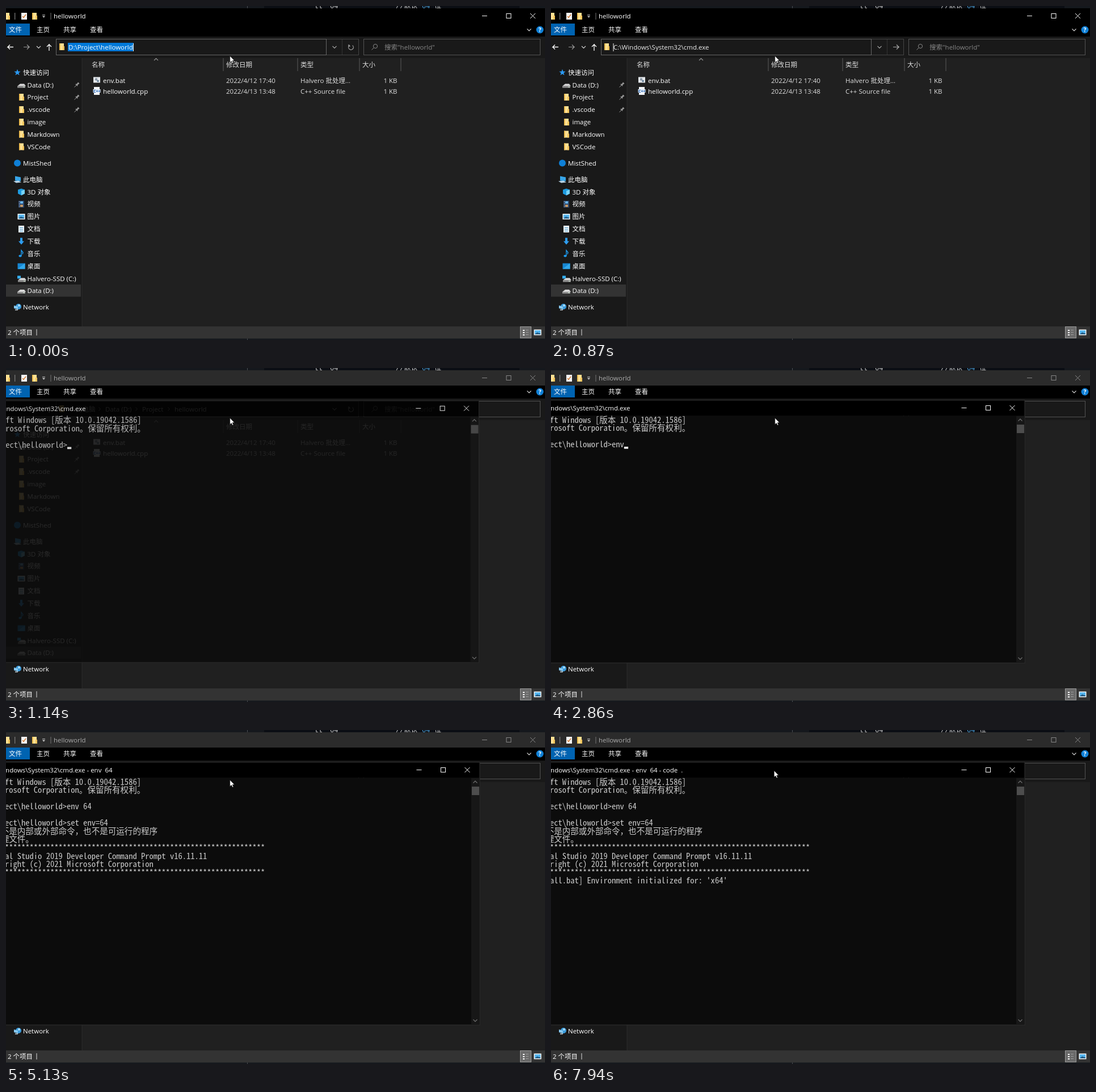
An HTML page with a canvas for the animation above (8000 ms loop, 950 by 590 pixels).

```html
<!DOCTYPE html>
<html lang="zh-CN">
<head>
<meta charset="utf-8">
<style>
html, body { margin: 0; width: 100%; height: 100%; overflow: hidden; background: #000; }
canvas { display: block; }
</style>
</head>
<body>
<canvas id="stage" width="950" height="590"></canvas>
<script>
const g = document.getElementById('stage').getContext('2d');
const LOOP = 8000;
const UI = '11.5px "Open Sans", "Noto Sans CJK SC", "Noto Sans CJK", sans-serif';
const MONO = '14.55px "Noto Sans Mono CJK SC", "Noto Sans CJK SC", "Liberation Mono", monospace';
const CELL = 7.274, ROW = 14.55, LEFT = -53;

function rect(x, y, w, h, color) {
  g.fillStyle = color;
  g.fillRect(x, y, w, h);
}
function frame(x, y, w, h, color) {
  g.strokeStyle = color;
  g.lineWidth = 1;
  g.strokeRect(x, y, w, h);
}
function trace(x, y, pts) {
  g.beginPath();
  for (let i = 0; i < pts.length; i += 2) g.lineTo(x + pts[i], y + pts[i + 1]);
}
function poly(x, y, pts, color) {
  trace(x, y, pts);
  g.fillStyle = color;
  g.fill();
}
function line(x, y, pts, color, width = 1) {
  trace(x, y, pts);
  g.strokeStyle = color;
  g.lineWidth = width;
  g.stroke();
}
function disc(x, y, rx, ry, color) {
  g.beginPath();
  g.ellipse(x, y, rx, ry, 0, 0, 7);
  g.fillStyle = color;
  g.fill();
}
// y is the visual middle of the line
function text(s, x, y, color = '#fff', font = UI) {
  g.font = font;
  g.fillStyle = color;
  g.fillText(s, x, y + 4.2);
}
const chevron = (x, y, color, dir = 1) => line(x, y, [-3.5, -1.7 * dir, 0, 1.8 * dir, 3.5, -1.7 * dir], color, 1.2);

function windowButtons(x, y, color) {
  line(x, y, [-4.5, 0, 4.5, 0], color);
  frame(x + 38.5, y - 4, 8, 8, color);
  line(x + 85, y, [-4.5, -4.5, 4.5, 4.5], color);
  line(x + 85, y, [4.5, -4.5, -4.5, 4.5], color);
}

// Small icons, centred on x, y
const icons = {
  star: (x, y) => {
    const pts = [];
    for (let i = 0; i < 10; i++) {
      const r = i % 2 ? 2.4 : 6, a = i * Math.PI / 5;
      pts.push(r * Math.sin(a), -r * Math.cos(a));
    }
    poly(x, y, pts, '#2b9af3');
  },
  folder: (x, y) => {
    rect(x - 4, y - 6, 8, 12, '#ffe093');
    rect(x + 2, y - 1, 3, 7, '#f2c55c');
    rect(x - 4, y - 6, 2, 12, '#efbe50');
  },
  drive: (x, y) => {
    poly(x, y, [-7, 2, -2, -2, 5, -2, 8, 2], '#d9d9d9');
    rect(x - 7, y + 2, 14, 3, '#8f8f8f');
    rect(x + 3, y + 3, 3, 1, '#e8ffe8');
  },
  system: (x, y) => {
    icons.drive(x + 1, y + 1);
    rect(x - 7, y - 5, 6, 5, '#35aef0');
  },
  cloud: (x, y) => disc(x, y, 6, 6, '#0f80d7'),
  computer: (x, y) => {
    poly(x, y, [-4, -6, 6, -4, 6, 3, -4, 2], '#37a5e8');
    poly(x, y, [-7, 3, 2, 2, 7, 5, -2, 6], '#b9d4e6');
  },
  cube: (x, y) => {
    poly(x, y, [0, -6, 6, -4, 6, 3, 0, 6, -6, 3, -6, -4], '#1d9be0');
    poly(x, y, [0, -2, 6, -4, 6, 3, 0, 6], '#78d3f7');
  },
  video: (x, y) => {
    rect(x - 5, y - 6, 10, 12, '#2c466b');
    rect(x - 2, y - 5, 5, 4, '#69b4e8');
    rect(x - 2, y + 1, 5, 4, '#c59663');
    for (let i = -5; i < 6; i += 3) rect(x - 4, y + i, 1, 1, '#ddd');
  },
  picture: (x, y) => {
    rect(x - 6.5, y - 5, 13, 10, '#f2f7fa');
    rect(x - 5, y - 3.5, 10, 7, '#54b5ef');
    poly(x, y, [-5, 3.5, -1, 0, 5, 2, 5, 3.5], '#245b83');
  },
  document: (x, y) => {
    rect(x - 5, y - 6, 10, 12, '#e8f2f8');
    for (let i = -3; i < 5; i += 3) rect(x - 3, y + i, 6, 1, '#4f9cca');
  },
  download: (x, y) => poly(x, y, [-2, -6, 2, -6, 2, 0, 5, 0, 0, 6, -5, 0, -2, 0], '#2e9df0'),
  music: (x, y) => {
    disc(x - 2, y + 4, 2.6, 2, '#1f9cf0');
    line(x, y, [0, 4, 0, -6, 3, -2, 2, 1], '#1f9cf0', 1.4);
  },
  desktop: (x, y) => {
    rect(x - 6.5, y - 5, 13, 10, '#1786d1');
    poly(x, y, [-6.5, 5, 6.5, -5, 6.5, 5], '#31a8ec');
  },
  network: (x, y) => {
    disc(x + 2, y - 1, 5, 5, '#3a9bdc');
    disc(x + 3, y - 3, 2, 2, '#a9dcf5');
    poly(x, y, [-6, -3, 1, -1, 1, 4, -6, 2], '#86c7ee');
    rect(x - 4, y + 4, 5, 1.5, '#c9d6de');
  },
  script: (x, y) => {
    rect(x - 6, y - 5, 12, 10, '#e4e8ec');
    disc(x - 1, y - 1, 2.2, 2.2, '#8b98a5');
    disc(x + 2, y + 2, 1.8, 1.8, '#5f7a94');
  },
  cpp: (x, y) => {
    rect(x - 5, y - 7, 10, 14, '#f3f5f8');
    rect(x - 6.5, y - 3, 13, 6, '#dbe8f7');
    text('C++', x - 6, y - 1.2, '#1858a8', 'bold 7px "Open Sans", sans-serif');
  }
};

const sidebar = [
  [117.5, 0, 'star', '快速访问'], [139.5, 1, 'drive', 'Data (D:)'], [161, 1, 'folder', 'Project'],
  [183, 1, 'folder', '.vscode'], [205, 1, 'folder', 'image'], [226.5, 1, 'folder', 'Markdown'],
  [248.5, 1, 'folder', 'VSCode'], [277.5, 0, 'cloud', 'MistShed'], [306.5, 0, 'computer', '此电脑'],
  [328.5, 1, 'cube', '3D 对象'], [350, 1, 'video', '视频'], [372, 1, 'picture', '图片'],
  [394, 1, 'document', '文档'], [415.5, 1, 'download', '下载'], [437.5, 1, 'music', '音乐'],
  [459.5, 1, 'desktop', '桌面'], [481.5, 1, 'system', 'Halvero-SSD (C:)'], [503, 1, 'drive', 'Data (D:)'],
  [532, 0, 'network', 'Network']
];

function drawBackdrop() {
  rect(0, 0, 950, 590, '#15181d');
  rect(455, 0, 450, 4, '#0b0e14');
  rect(425, 0, 1, 590, '#4a4d52');
  const code = '12px "Liberation Mono", "Noto Sans CJK SC", monospace';
  text('ll', 543, -0.5, '#c8c8c8', code);
  text('64', 571, -0.5, '#c8c8c8', code);
  text('//默认', 687, -0.5, '#c8c8c8', code);
  text('64', 733, -0.5, '#4a9fd8', code);
  text('位', 755, -0.5, '#c8c8c8', code);
}

function drawTitleBar(active) {
  const ink = active ? '#fff' : '#aaa';
  rect(0, 4, 950, 27, active ? '#000' : '#2b2b2b');
  icons.folder(2, 18);
  rect(15, 12, 1.3, 12, '#777');
  rect(27, 12, 10, 12, '#f4f4f4');
  line(32, 18, [-3, 0, -1, 2.5, 3, -3], '#d2762c', 1.3);
  icons.folder(50, 18);
  rect(64, 15.5, 5, 1, '#ddd');
  poly(66.5, 18, [-2.5, 0, 2.5, 0, 0, 2.5], '#ddd');
  rect(78.5, 12, 1, 12, '#777');
  text('helloworld', 84, 17.5, ink);
  windowButtons(843.5, 17.5, active ? '#fff' : '#888');

  rect(0, 31, 950, 23, '#000');
  rect(0, 31, 42, 21, '#0063b1');
  ['文件', '主页', '共享', '查看'].forEach((s, i) => text(s, [5, 54, 101, 148][i], 42));
  chevron(922, 42, '#ddd');
  disc(941, 42, 6.5, 6.5, '#0f80d7');
  text('?', 938.5, 42, '#fff', 'bold 10.5px "Open Sans", sans-serif');
}

function drawAddressBar(t) {
  const editing = t < 940;
  rect(0, 54, 950, 38, '#191919');
  line(8, 72.5, [5, 0, -5, 0, -1, -4, -5, 0, -1, 4], '#fff', 1.3);
  line(36, 72.5, [-5, 0, 5, 0, 1, -4, 5, 0, 1, 4], '#999', 1.2);
  chevron(57.5, 72.5, '#ddd');
  line(76, 73, [0, 6, 0, -5, -4, -1, 0, -5, 4, -1], '#fff', 1.3);

  frame(88.5, 58.5, 533, 28, editing ? '#444' : '#535353');
  if (editing) {
    frame(88.5, 58.5, 476, 28, '#666');
    rect(592, 59, 1, 27, '#333');
  }
  icons.folder(98, 72);
  chevron(579, 72.5, '#aaa');
  if (editing && t >= 270) {
    line(608, 72.5, [-5, 0, 5, 0, 1, -4, 5, 0, 1, 4], '#aaa', 1.2);
  } else {
    g.beginPath();
    g.arc(608, 73, 4.3, -0.9, 4.2);
    g.strokeStyle = '#aaa';
    g.lineWidth = 1.2;
    g.stroke();
    line(608, 73, [-4, -5, -4, -2, -1, -2], '#aaa', 1.2);
  }

  if (!editing) {
    const crumbs = [['此电脑', 123], ['Data (D:)', 175], ['Project', 240], ['helloworld', 297]];
    for (const [s, x] of crumbs) {
      line(x - 10, 72.5, [-1.5, -3, 1.5, 0, -1.5, 3], '#aaa');
      text(s, x, 72.5, '#ddd');
    }
  } else if (t < 270) {
    rect(109, 65, 116, 15, '#0078d7');
    text('D:\\Project\\helloworld', 110, 72.5);
    rect(224, 66, 1, 14, '#fff');
  } else if (t < 750) {
    const typed = 'cmd'.slice(0, t < 400 ? 1 : t < 530 ? 2 : 3);
    text(typed, 110, 72.5);
    rect(110 + g.measureText(typed).width, 66, 1, 14, '#fff');
  } else {
    text('C:\\Windows\\System32\\cmd.exe', 110, 72.5, '#eee');
    if (t >= 870) rect(109.5, 66, 1, 14, '#fff');
  }

  frame(630.5, 58.5, 311, 28, '#535353');
  g.beginPath();
  g.arc(651, 71, 3.6, 0, 7);
  g.strokeStyle = '#888';
  g.lineWidth = 1;
  g.stroke();
  line(648.5, 73.5, [0, 0, -4, 4], '#888');
  text('搜索"helloworld"', 667, 72.5, '#858585');
}

function drawFiles() {
  rect(0, 92, 134, 474, '#191919');
  rect(134, 92, 816, 474, '#202020');
  rect(133.5, 92, 1, 474, '#2c2c2c');
  rect(0, 492, 132, 21.5, '#333');
  for (const [y, level, icon, label] of sidebar) {
    icons[icon](level ? 27 : 20, y);
    text(label, level ? 37.5 : 30, y);
  }
  for (const y of [139, 161, 183]) {
    line(125, y, [-4.5, 4.5, -1, 1], '#999');
    poly(125, y, [-3, -1, 0, -1.5, 2, -4.5, 4.5, -2, 1.5, 0, 1, 3], '#999');
  }

  chevron(264.5, 94.5, '#999', -1);
  for (const x of [383, 514, 623, 696]) rect(x - 0.5, 92, 1, 23, '#5a5a5a');
  [['名称', 151], ['修改日期', 388], ['类型', 519], ['大小', 628]].forEach(([s, x]) => text(s, x, 104, '#dedede'));
  const rows = [
    [131.5, 'script', 'env.bat', '2022/4/12 17:40', 'Halvero 批处理...'],
    [151, 'cpp', 'helloworld.cpp', '2022/4/13 13:48', 'C++ Source file']
  ];
  for (const [y, icon, name, date, type] of rows) {
    icons[icon](160, y - 1);
    text(name, 171, y);
    text(date, 388, y, '#dedede');
    text(type, 519, y, '#dedede');
    text('1 KB', 665.5, y, '#dedede');
  }
}

function drawStatusBar() {
  rect(0, 566, 950, 21.5, '#333');
  text('2 个项目', 3, 576.5);
  rect(53.5, 571, 1, 11, '#ddd');
  rect(906, 566, 20, 21, '#6a6a6a');
  frame(906.5, 566.5, 19, 20, '#999');
  for (const y of [572, 576, 580]) {
    rect(911, y, 3, 2, '#fff');
    rect(916, y, 5, 1, '#999');
  }
  icons.picture(937, 576.5);
}

function drawSuggestions() {
  rect(110, 87, 483, 98, '#2b2b2b');
  frame(110.5, 87.5, 482, 97, '#4a4a4a');
  text('cmd', 114, 98);
  text('在"helloworld"中搜索"cmd"', 114, 118);
}

// Each character sits on the terminal grid; CJK takes two cells
function terminal(s, row) {
  let x = LEFT;
  g.font = MONO;
  g.fillStyle = '#ccc';
  for (const ch of s) {
    g.fillText(ch, x, 96.6 + row * ROW);
    x += ch.charCodeAt(0) > 0x2e80 ? 2 * CELL : CELL;
  }
}

const PROMPT = 'D:\\Project\\helloworld>';
const STARS = '*'.repeat(70);
const output = [
  [0, 0, 'Microsoft Windows [版本 10.0.19042.1586]'],
  [0, 1, '(c) Microsoft Corporation。保留所有权利。'],
  [4790, 5, PROMPT + 'set env=64'],
  [4860, 6, '      不是内部或外部命令，也不是可运行的程序'],
  [4860, 7, '或批处理文件。'],
  [5130, 8, STARS],
  [5130, 9, '** Visual Studio 2019 Developer Command Prompt v16.11.11'],
  [5130, 10, '** Copyright (c) 2021 Microsoft Corporation'],
  [5130, 11, STARS],
  [6260, 12, "[vcvarsall.bat] Environment initialized for: 'x64'"]
];
const keyTimes = [2460, 2660, 2860, 3120, 3930, 4130];
const caretOff = [[1930, 2660], [2990, 3120], [3520, 3930], [4060, 4130], [4590, LOOP]];
// time, scale, opacity of the opening window
const opening = [[940, 0.95, 0.2], [1010, 0.98, 0.55], [1070, 0.99, 0.75], [1140, 0.9965, 0.88], [1210, 1, 1]];

function drawConsole(t) {
  const pose = opening.filter(p => t >= p[0]).pop();
  if (!pose) return;
  g.save();
  g.translate(387, 289);
  g.scale(pose[1], pose[1]);
  g.translate(-387, -289);
  g.globalAlpha = pose[2];

  rect(-70, 57, 905, 27.5, '#000');
  rect(-70, 84.5, 905, 436.5, '#0c0c0c');
  frame(-70.5, 57, 905.5, 464, '#303030');
  let title = 'C:\\Windows\\System32\\cmd.exe';
  if (t >= 4790) title += ' - env  64';
  if (t >= 6330) title += ' - code  .';
  text(title, -29, 71);
  windowButtons(728, 70.5, '#fff');

  rect(820, 85, 14.5, 435.5, '#171717');
  rect(821, 100, 13, 15, '#4d4d4d');
  chevron(827, 92, '#777', -1);
  chevron(827, 513, '#777');

  for (const [start, row, s] of output) if (t >= start) terminal(s, row);
  const typed = keyTimes.filter(k => t >= k).length;
  terminal(PROMPT + 'env 64'.slice(0, typed), 3);
  if (!caretOff.some(([a, b]) => t >= a && t < b)) rect(107 + typed * CELL, 139, CELL, 3.7, '#f2f2f2');
  g.restore();
}

function drawPointer(t) {
  const step = t < 7800 ? 0 : Math.min(3, 1 + Math.floor((t - 7800) / 70));
  const shape = [0, 0, 0, 11.5, 2.6, 9.2, 4.4, 13, 6.2, 12.2, 4.5, 8.5, 8, 8.2, 0, 0];
  const x = 394.7 - step * 0.5, y = 88.2 - step * 5.5;
  poly(x, y, shape, '#fff');
  line(x, y, shape, '#000', 0.6);
}

function draw(now) {
  const t = now % LOOP;
  drawBackdrop();
  drawTitleBar(t < 1010);
  drawAddressBar(t);
  drawFiles();
  drawStatusBar();
  if (t >= 400 && t < 750) drawSuggestions();
  drawConsole(t);
  drawPointer(t);
  requestAnimationFrame(draw);
}
requestAnimationFrame(draw);
</script>
</body>
</html>
```
